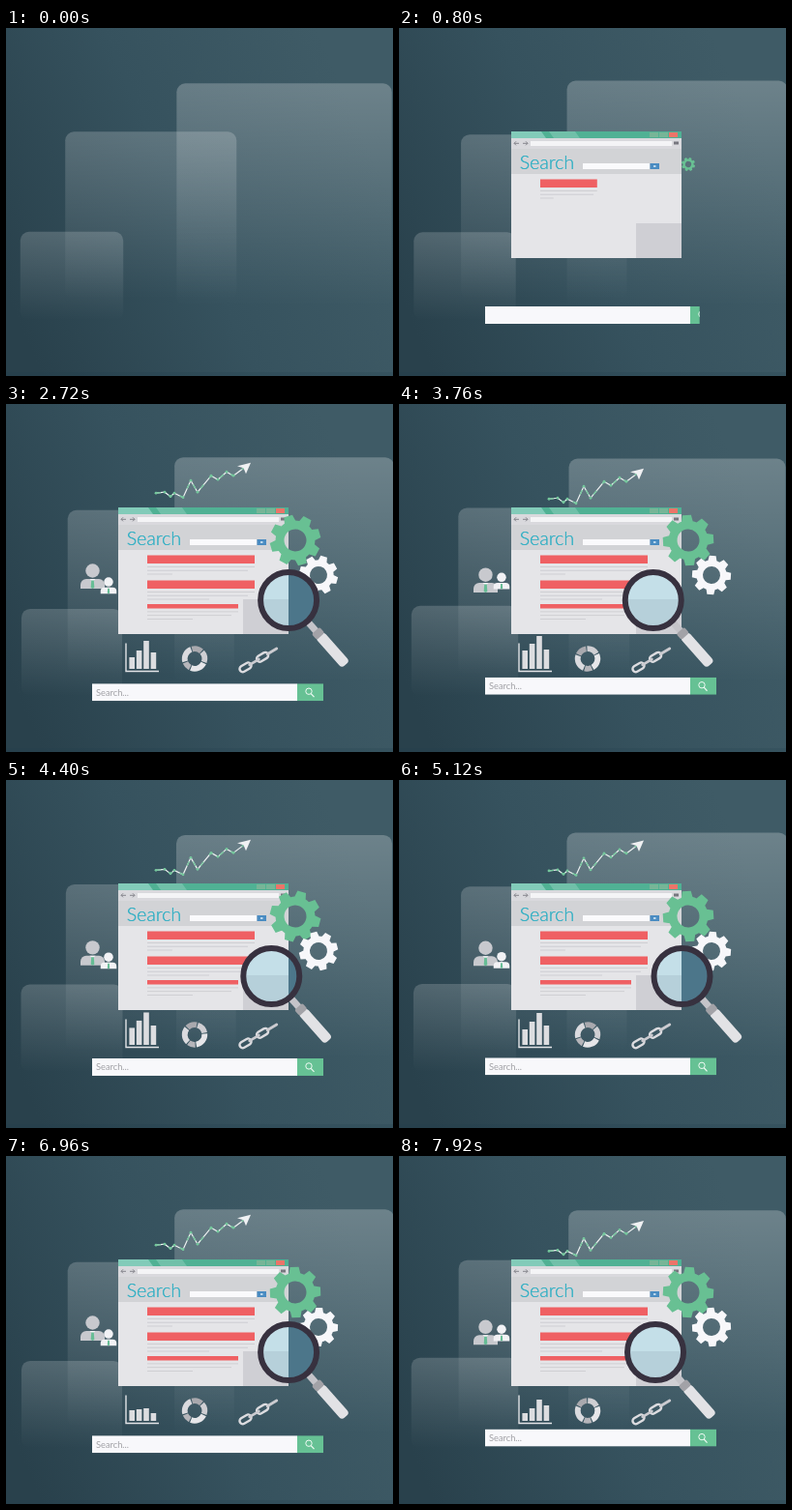
Recreate the animation shown at these times as an HTML page with a canvas. Size 400 px wide and 360 px high, loop 8000 ms.

```html
<!DOCTYPE html>
<html lang="en">
<head>
<meta charset="utf-8">
<title>Search</title>
<style>
html, body { margin: 0; width: 100%; height: 100%; overflow: hidden; background: #38535f; }
canvas { display: block; width: 400px; height: 360px; }
</style>
</head>
<body>
<canvas id="stage" width="400" height="360"></canvas>
<script>
const c = document.getElementById('stage').getContext('2d');
const LOOP = 8000, SWAY = 2120, TAU = Math.PI * 2;

const clamp = v => Math.max(0, Math.min(1, v));
const span = (t, a, b) => clamp((t - a) / (b - a));
const easeOut = u => 1 - (1 - u) ** 3;
const wave = (t, lead = 0) => Math.cos(TAU * ((t - 2870) / SWAY + lead));

function box(x, y, w, h, fill) {
  c.fillStyle = fill;
  c.fillRect(x, y, w, h);
}
function round(x, y, w, h, r, fill) {
  c.fillStyle = fill;
  c.beginPath();
  c.roundRect(x, y, w, h, r);
  c.fill();
}
function disc(x, y, r, fill) {
  c.fillStyle = fill;
  c.beginPath();
  c.arc(x, y, r, 0, TAU);
  c.fill();
}
function path(points, fill, stroke, width = 1) {
  c.beginPath();
  points.forEach(([x, y]) => c.lineTo(x, y));
  if (fill) { c.fillStyle = fill; c.fill(); }
  if (stroke) { c.strokeStyle = stroke; c.lineWidth = width; c.stroke(); }
}
function label(text, x, y, font, fill) {
  c.font = font;
  c.fillStyle = fill;
  c.fillText(text, x, y);
}
// Draws in a space moved to x, y, then turned and scaled.
function at(x, y, angle, scale, draw) {
  if (scale <= 0) return;
  c.save();
  c.translate(x, y);
  c.rotate(angle);
  c.scale(scale, scale);
  draw();
  c.restore();
}
function clipped(x, y, w, h, draw) {
  c.save();
  c.beginPath();
  c.rect(x, y, w, h);
  c.clip();
  draw();
  c.restore();
}

function backdrop() {
  const g = c.createLinearGradient(20, 320, 390, 157);
  g.addColorStop(0, '#29414c');
  g.addColorStop(.5, '#36525e');
  g.addColorStop(1, '#3f5b66');
  box(0, 0, 400, 360, g);
  box(0, 356, 400, 4, 'rgba(30,62,78,.2)');
}
function card(x, y, w, h, inset, alpha) {
  const top = y + inset;
  const g = c.createLinearGradient(0, top, 0, y + h);
  g.addColorStop(0, `rgba(255,255,255,${alpha})`);
  g.addColorStop(1, 'rgba(255,255,255,0)');
  round(x + inset, top, w - 2 * inset, h - inset, 9, g);
}
function cards(t) {
  card(174.9, 55.9, 225.3, 232, -1.5 * wave(t, -.1), .24);
  card(62.5, 108.6, 174.5, 172, 1.6 * wave(t, -.04), .2);
  card(14.4, 210.4, 107.2, 92, 1.7 * wave(t, .14), .18);
}

function page() {
  box(116, 107, 176, 131, '#e5e5e8');
  box(116, 107, 176, 7, '#50b194');
  path([[116, 107], [147, 107], [152, 114], [116, 114]], '#82cbb9');
  path([[155, 107], [182, 107], [187, 114], [160, 114]], '#70c0a9');
  box(259, 108, 9, 5, '#77b597');
  box(269, 108, 9, 5, '#77b597');
  box(279, 108, 9, 5, '#ec7469');
  box(116, 114, 176, 11, '#d9d9dd');
  for (const [x, d] of [[119, 2], [133, -2]]) {
    path([[x + d, 117.3], [x, 119.3], [x + d, 121.3]], null, '#85858c');
    path([[x, 119.3], [x + 2.5 * d, 119.3]], null, '#85858c');
  }
  box(136, 117, 146, 5, '#f4f4f6');
  box(284, 117.5, 5, 3, '#77777f');
  box(116, 125, 176, 26, '#d2d3d6');
  label('Search', 124.6, 146.3, '300 19.6px Lato, sans-serif', '#35b0c4');
  label('Search', 124.9, 146.3, '300 19.6px Lato, sans-serif', '#35b0c4');
  box(190, 140, 69, 6, '#fafafc');
  box(259.5, 140, 9.5, 6, '#4a8cc2');
  box(263, 142, 2.5, 2, '#b9d6ec');
  box(245, 202, 47, 36, '#cfcfd4');
}
function results(t) {
  const rows = [[156.5, 111, 8.5], [182.5, 111, 8.5], [207, 94, 4.5]];
  rows.forEach(([y, w, h], i) => {
    const u = easeOut(span(t, 700 + i * 360, 1150 + i * 400));
    box(146, y, w * u, h, '#ef6063');
    [w, w - 7, i ? w - 47 : 26].forEach((len, k) =>
      box(146, y + h + 3 + k * 3.8, len * u, .8, '#c9c9ce'));
  });
}

function gear(x, y, r, hole, angle, scale, fill) {
  at(x, y, angle, scale, () => {
    const teeth = 8, step = TAU / teeth, root = r * .77;
    c.beginPath();
    for (let i = 0; i < teeth; i++) {
      const a = i * step - TAU / 4;
      for (const [d, rad] of [[-.29, root], [-.17, r], [.17, r], [.29, root]])
        c.lineTo(rad * Math.cos(a + d), rad * Math.sin(a + d));
      c.arc(0, 0, root, a + .29, a + step - .29);
    }
    c.closePath();
    c.moveTo(hole, 0);
    c.arc(0, 0, hole, 0, TAU, true);
    c.fillStyle = fill;
    c.fill('evenodd');
  });
}

function lens(t) {
  const x = 277.2 + 16.5 * wave(t) + 150 * (1 - easeOut(span(t, 1000, 2000))), y = 203;
  if (t < 1000) return;
  at(x, y, .845, 1, () => {
    box(31, -3.5, 15, 7, '#c4c4c9');
    round(48, -5.5, 41, 11, 4, '#e2e2e5');
    round(42, -5.5, 8, 11, 2, '#a2a2a7');
  });
  c.save();
  c.beginPath();
  c.arc(x, y, 27, 0, TAU);
  c.clip();
  box(x - 30, y - 30, 60, 60, '#4c768a');
  box(x - 30, y - 30, 292 - x + 30, 60, '#c4dfe8');
  box(x - 30, 202, 292 - x + 30, 32, '#b6d0da');
  c.restore();
  c.beginPath();
  c.arc(x, y, 29, 0, TAU);
  c.lineWidth = 6;
  c.strokeStyle = '#37313f';
  c.stroke();
}

const trend = [[0, 0], [9, -1], [15, 3.5], [19, 0], [28, 4.5], [36, -13], [43, -1],
  [57, -18], [64, -14], [73, -22], [80, -18], [92, -27]];
function chart(t) {
  const u = span(t, 1150, 2000);
  at(155, 95.2 - 3.2 * wave(t, .125), 0, 1, () => clipped(-3, -50, 103 * u, 70, () => {
    path(trend, null, '#eef1f2', 1.2);
    c.setLineDash([5, 9]);
    path(trend, null, '#74c79c', 1.3);
    c.setLineDash([]);
    trend.slice(0, -1).forEach(([x, y]) => disc(x, y, 1.4, '#74c79c'));
    path([[98, -31.5], [84, -28], [90.5, -26], [93, -20]], '#f0f1f3');
  }));
}

function person(x, y, scale, fill, tie) {
  at(x, y, 0, scale, () => {
    disc(0, -18.4, 7.2, fill);
    round(-12.5, -10, 25, 10, [6, 6, 0, 0], fill);
    path([[-3, -10], [0, -7.5], [3, -10]], '#f6f6f8');
    path([[-1.3, -8.5], [1.3, -8.5], [1.8, -1], [0, 0], [-1.8, -1]], tie);
  });
}
function people(t) {
  const sway = wave(t, .125);
  person(89.5, 193 - 2.2 * sway, easeOut(span(t, 1450, 2100)), '#c8c9ce', '#66bd95');
  person(106, 193.9 + 2.5 * sway, .66 * easeOut(span(t, 1600, 2250)), '#f2f2f5', '#66bd95');
}

// Bar heights at a few moments: time, then the four bars.
const levels = [[1700, 0, 0, 0, 0], [2720, 12, 19, 29, 17], [3760, 19, 26, 34, 20],
  [5120, 16, 24, 33, 20], [6960, 11, 12, 13, 8], [7920, 8, 13, 22, 16], [8000, 8, 14, 23, 17]];
function bars(t) {
  at(124, 276.5, 0, easeOut(span(t, 1490, 2100)), () => {
    path([[0, -29], [0, 0], [34, 0]], null, '#e3e4e7', 1.4);
    const i = Math.max(1, levels.findIndex(l => l[0] > t));
    const [a, b] = [levels[i - 1], levels[i]];
    const u = span(t, a[0], b[0]);
    for (let k = 1; k < 5; k++) {
      const h = a[k] + (b[k] - a[k]) * u;
      box(-4 + k * 7.4, -2.5 - h, 5.6, h, '#dcdde0');
    }
  });
}

function donut(t) {
  const u = easeOut(span(t, 1150, 1900));
  at(195, 263.5, wave(t) * .5 - 2 * (1 - u), u, () => {
    [['#e6e6e9', 0, 1.5], ['#b5b5ba', 1.6, 2.3], ['#dadade', 2.4, 3.9],
      ['#a9a9ae', 4, 5], ['#cfcfd3', 5.1, 6.18]].forEach(([tone, a, b]) => {
      c.beginPath();
      c.arc(0, 0, 10.3, a, a + (b - a) * u);
      c.lineWidth = 5.8;
      c.strokeStyle = tone;
      c.stroke();
    });
  });
}

// Open links alternate with links seen edge-on.
function chain(t) {
  const u = easeOut(span(t, 1100, 2000));
  at(260.8, 264.4, -.54, u, () => {
    for (const x of [-15.5, 5]) {
      c.beginPath();
      c.roundRect(x - 6.5, -3.2, 13, 6.4, 3.2);
      c.lineWidth = 2.4;
      c.strokeStyle = '#dcdce0';
      c.stroke();
    }
    for (const x of [-5, 16.5]) round(x - 7, -1.4, 14, 2.8, 1.4, '#cbcbd0');
  });
}

function searchBar(t) {
  const u = easeOut(span(t, 450, 1050));
  at(0, 3 + 3.4 * wave(t, .125), 0, 1, () => clipped(89, 283, 239 * u, 18, () => {
    box(89, 283, 212, 18, '#f8f8fb');
    box(301, 283, 27, 18, '#66c194');
    c.beginPath();
    c.arc(313, 291, 3.2, 0, TAU);
    c.lineWidth = 1;
    c.strokeStyle = '#eefaf3';
    c.stroke();
    path([[315.2, 293.4], [318.5, 297]], null, '#eefaf3', 1.2);
    clipped(92, 284, 40 * span(t, 1050, 1780), 16, () =>
      label('Search...', 93, 295.3, '9.3px Lato, sans-serif', '#a0a0a5'));
  }));
}

function draw(t) {
  backdrop();
  cards(t);
  at(204, 172.5, 0, easeOut(span(t, 80, 700)), () => {
    c.translate(-204, -172.5);
    page();
    results(t);
  });
  const turn = (t - 1520) / 455 * TAU / 8;
  gear(299, 141, 26.5, 11.5, turn, easeOut(span(t, 750, 1250)), '#68c093');
  gear(323, 177, 20.3, 9, -turn, easeOut(span(t, 900, 1400)), '#f7f7fa');
  chart(t);
  people(t);
  bars(t);
  donut(t);
  chain(t);
  searchBar(t);
  lens(t);
}

function frame() {
  draw(Math.floor(performance.now() % LOOP / 80) * 80);
  requestAnimationFrame(frame);
}
frame();
</script>
</body>
</html>
```
